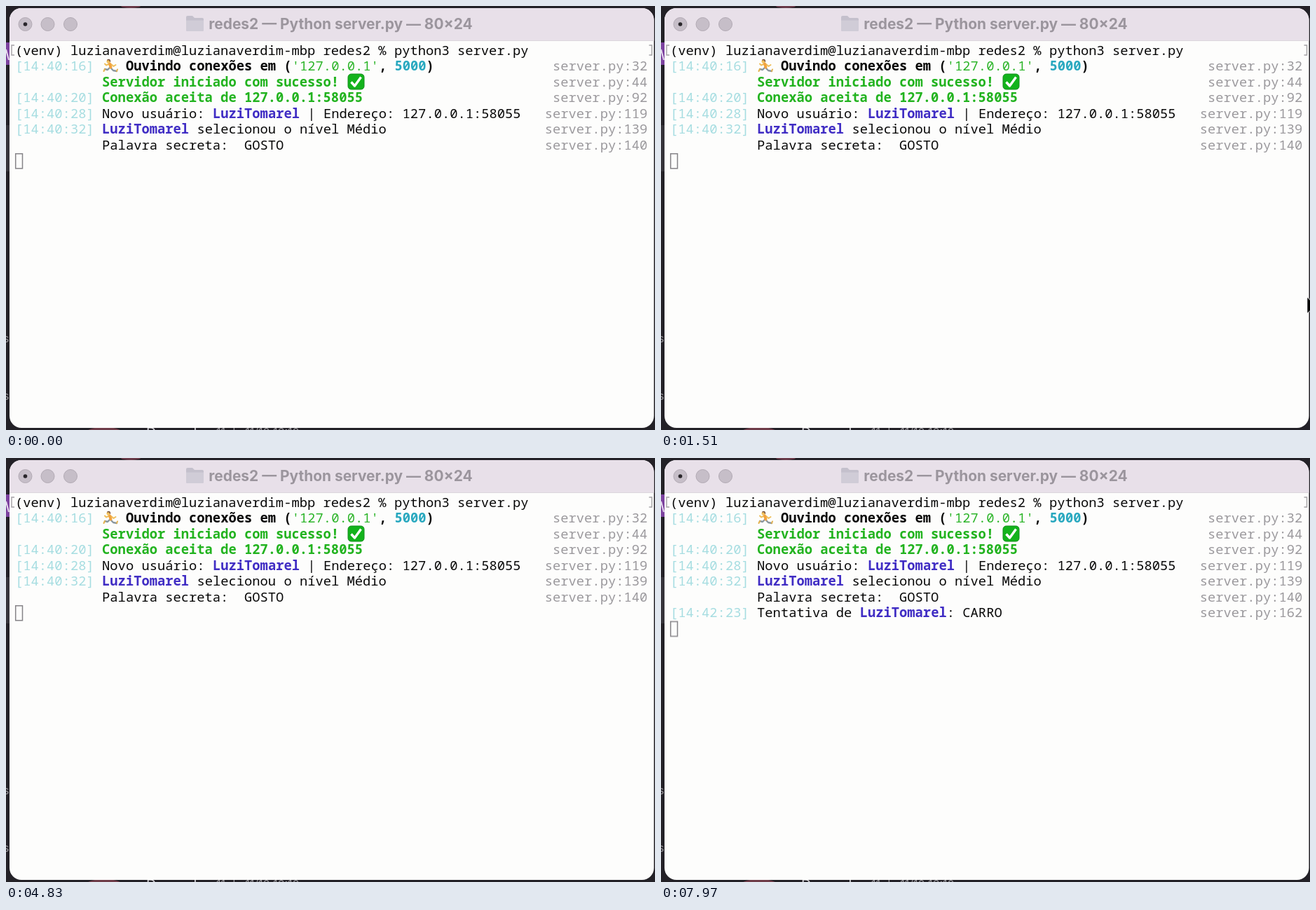
An HTML page for the animation above (7990 ms loop, 926 by 605 pixels).

```html
<!DOCTYPE html>
<html lang="pt">
<head>
<meta charset="utf-8">
<title>Terminal</title>
<style>
  html, body { margin: 0; width: 100%; height: 100%; overflow: hidden; background: #232127; }
  svg { display: block; width: 926px; height: 605px; }
  .row text { font: 500 18.8px "Noto Sans Mono", "DejaVu Sans Mono", monospace; white-space: pre; fill: #080808; }
  .row .time { fill: #a6dde1; }
  .row .line { fill: #9b999d; }
  .row .bold { font-weight: 700; }
  .row .ok { font-weight: 700; fill: #22b31f; }
  .row .str { fill: #2bb428; }
  .row .num { font-weight: 700; fill: #28a8bf; }
  .row .user { font-weight: 700; fill: #402dc4; }
  .title { font: 700 20.9px Inter, "Open Sans", sans-serif; fill: #9b959d; }
  .behind { font: 20px Inter, sans-serif; fill: #d5d3d7; }
  .behind.small { font-size: 16px; fill: #97959a; }
</style>
</head>
<body>
<svg viewBox="0 0 926 605">
  <!-- desktop showing around the window -->
  <rect width="926" height="605" fill="#232127"/>
  <rect y="52" width="6" height="32" fill="#7c429f"/>
  <path d="M0 62L4 77" stroke="#e9ddf0" stroke-width="2"/>
  <rect y="170" width="6" height="66" fill="#35333a"/>
  <text class="behind small" x="-4" y="480">s</text>
  <text class="behind small" x="-4" y="562">s</text>
  <ellipse cx="178" cy="0" rx="14" ry="3" fill="#6b3c4b"/>
  <ellipse cx="140" cy="607" rx="24" ry="6" fill="#6e3c48"/>
  <text class="behind" x="200" y="616">Doravel</text>
  <text class="behind small" x="300" y="614">11 de 11/10 16:10</text>

  <!-- window -->
  <rect x="5" y="3" width="919.5" height="599" rx="17" fill="#fdfdfc"/>
  <path d="M5 49V20a17 17 0 0 1 17-17H907.5a17 17 0 0 1 17 17V49Z" fill="#e8e0e9"/>
  <path d="M5 49.5H924.5" stroke="#dcd6dd"/>
  <g fill="#c6bec8" stroke="#b2aab4">
    <circle cx="27.5" cy="26" r="9.5"/>
    <circle cx="59.5" cy="26" r="9.5"/>
    <circle cx="92" cy="26" r="9.5"/>
  </g>
  <circle cx="27.5" cy="26" r="2.8" fill="#29262b"/>
  <path d="M257 16q0-2 2-2h7l3 3h11q2 0 2 2v15q0 2-2 2h-21q-2 0-2-2Z" fill="#c4c0cc"/>
  <path d="M257 20.5h25v13.5q0 2-2 2h-21q-2 0-2-2Z" fill="#d0ccd7"/>
  <text class="title" x="477.5" y="32.5" text-anchor="middle">redes2 — Python server.py — 80×24</text>
  <path d="M12 56H8V70H12 M917.5 56H921.5V70H917.5" fill="none" stroke="#a5a3a6" stroke-width="1.4"/>
  <g id="rows"></g>

  <!-- runner -->
  <g transform="translate(138 75)" fill="none" stroke-linecap="round" stroke-linejoin="round">
    <path d="M10 13L7 16L3 15M12 14L15 17L20 18" stroke="#8b979f" stroke-width="2.4"/>
    <path d="M3 15L1.5 18M20 18L21 15.5" stroke="#e3b04c" stroke-width="2"/>
    <path d="M10 7L5 9.5L3 7.5M12 8L15.5 11L18.5 9" stroke="#efbf5c" stroke-width="2"/>
    <path d="M10 7.5L11.5 12.5" stroke="#f2a33e" stroke-width="4"/>
    <circle cx="8" cy="4" r="2.5" fill="#efbf5c"/>
    <path d="M7 2Q10 0.5 10.5 4" stroke="#7a5540" stroke-width="1.6"/>
  </g>

  <!-- check mark -->
  <rect x="488" y="97" width="23" height="22" rx="4.5" fill="#13b31c" stroke="#148d1c"/>
  <path d="M492.5 108.5L497.5 114L506.5 101.5" fill="none" stroke="#fff" stroke-width="3.4" stroke-linejoin="round"/>

  <rect id="caret" x="13.7" y="210.8" width="9.8" height="21" fill="none" stroke="#858387" stroke-width="1.5"/>
  <path id="pointer" d="M0 0V22L5 17.5L8.5 25.5L12 24L8.6 16.2L15.5 16Z" stroke="#fff" stroke-width="1.6" paint-order="stroke"/>
</svg>
<script>
  const LOOP = 7990, LOG_AT = 5000;
  const CELL = 11.28, LEFT = 13, TOP = 69.6, LEADING = 22.55, COLS = 80;
  const user = ['user', 'LuziTomarel'];

  // time, [class, text] pieces, source line
  const rows = [
    ['(venv) luzianaverdim@luzianaverdim-mbp redes2 % python3 server.py', [], ''],
    ['[14:40:16]', [['bold', '   Ouvindo conexões em ('], ['str', "'127.0.0.1'"], ['bold', ', '],
      ['num', '5000'], ['bold', ')']], 32],
    ['', [['ok', 'Servidor iniciado com sucesso!']], 44],
    ['[14:40:20]', [['ok', 'Conexão aceita de 127.0.0.1:58055']], 92],
    ['[14:40:28]', [['', 'Novo usuário: '], user, ['', ' | Endereço: 127.0.0.1:58055']], 119],
    ['[14:40:32]', [user, ['', ' selecionou o nível Médio']], 139],
    ['', [['', 'Palavra secreta:  GOSTO']], 140],
    ['[14:42:23]', [['', 'Tentativa de '], user, ['', ': CARRO']], 162]
  ];

  function add(parent, tag, attrs, text = '') {
    const el = document.createElementNS(parent.namespaceURI, tag);
    for (const key in attrs) el.setAttribute(key, attrs[key]);
    el.textContent = text;
    return parent.appendChild(el);
  }

  const rowGroups = rows.map(([head, pieces, line], i) => {
    const group = add(document.getElementById('rows'), 'g', { class: 'row' });
    const put = (col, cls, text) =>
      add(group, 'text', { x: LEFT + col * CELL, y: TOP + i * LEADING, class: cls }, text);
    put(0, i ? 'time' : '', head);
    let col = 11;
    for (const [cls, text] of pieces) {
      // start at the first visible character so leading spaces keep the grid
      const indent = text.length - text.trimStart().length;
      put(col + indent, cls, text.trim());
      col += text.length;
    }
    if (line) {
      const label = 'server.py:' + line;
      put(COLS - label.length, 'line', label);
    }
    return group;
  });

  // steps: [ms, value]
  function play(el, property, steps) {
    const frames = steps.map(([ms, value]) => ({ offset: ms / LOOP, [property]: value }));
    el.animate(frames, { duration: LOOP, iterations: Infinity }).startTime = 0;
  }

  const jump = (before, after) => [[0, before], [LOG_AT, before], [LOG_AT, after], [LOOP, after]];
  play(rowGroups[7], 'opacity', jump(0, 1));
  play(document.getElementById('caret'), 'transform',
    jump('translate(0px, 0px)', `translate(0px, ${LEADING}px)`));

  const path = [[0, 940, 500], [680, 940, 500], [940, 836, 458], [1010, 833, 455], [1180, 836, 453],
    [1510, 922, 416], [1580, 940, 410], [LOOP, 940, 410]];
  play(document.getElementById('pointer'), 'transform',
    path.map(([ms, x, y]) => [ms, `translate(${x}px, ${y}px)`]));
</script>
</body>
</html>
```
